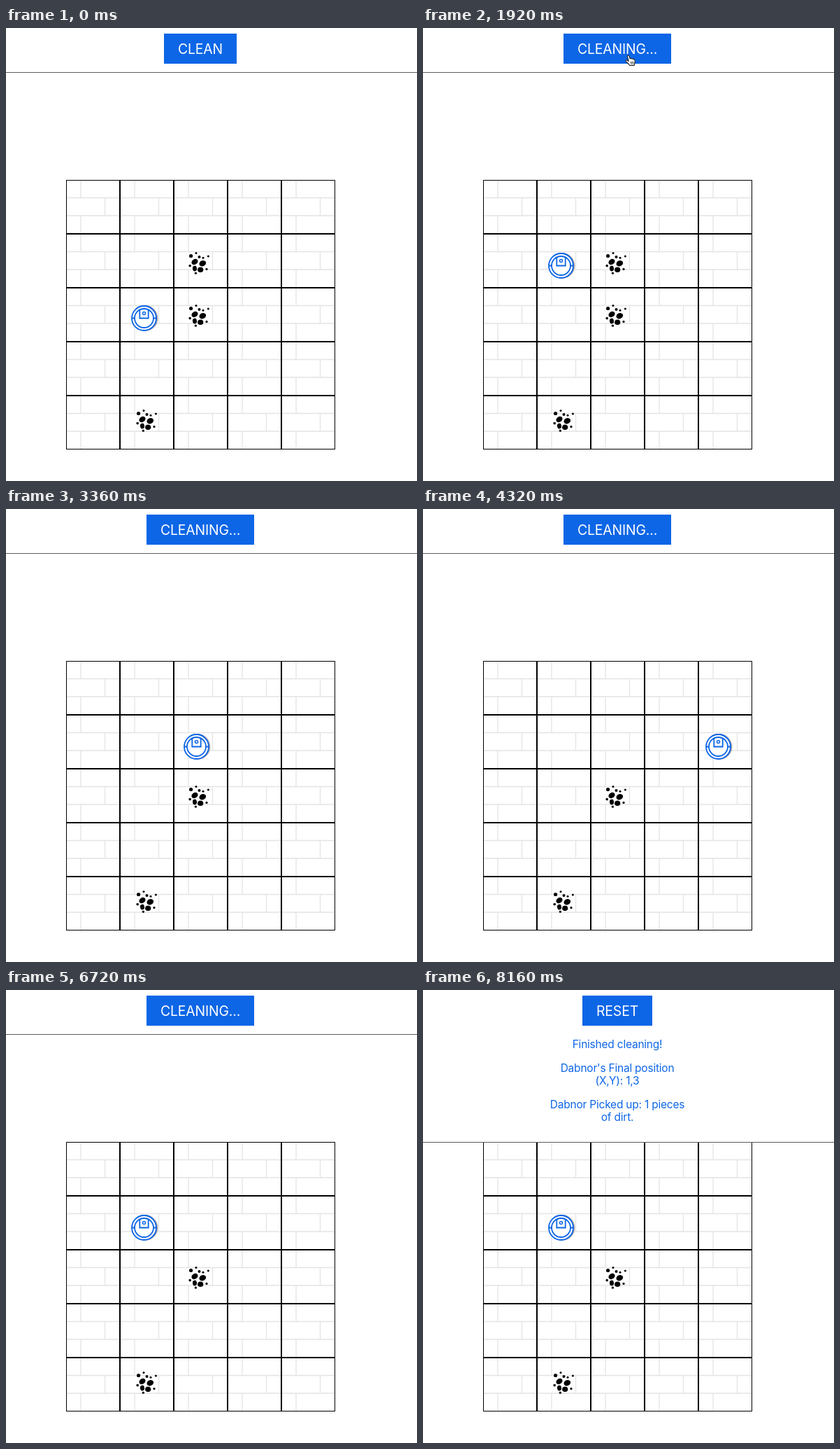
These frames come from a looping animation (588x647 px, 8.64 s). An HTML page:

```html
<!DOCTYPE html>
<html lang="en">
<head>
<meta charset="utf-8">
<title>Robot vacuum</title>
<style>
  html, body { margin: 0; width: 100%; height: 100%; overflow: hidden; background: #fff; }
  svg { display: block; }
  text { font-family: Inter, "Liberation Sans", sans-serif; text-anchor: middle; }
  #label { font-size: 19.4px; letter-spacing: -.15px; fill: #fff; }
  #report { font-size: 15.5px; letter-spacing: -.22px; fill: #0d66e6; }
</style>
</head>
<body>
<svg width="588" height="647" viewBox="0 0 588 647">
  <defs>
    <g id="cell">
      <path d="M1 25.5H76M1 51H76M21 1V25.5M55.5 25.5V51M21 51V76" stroke="#e4e4e4" stroke-width="1.3"/>
      <rect x=".5" y=".5" width="76" height="76" fill="none" stroke="#000"/>
    </g>
    <g id="dirt">
      <circle cx="3.6" cy="5.5" r="2.6"/>
      <circle cx="11" cy="1.6" r="1.5"/>
      <circle cx="15.5" cy="7" r="2"/>
      <circle cx="21" cy="8.3" r="1.5"/>
      <circle cx="28.4" cy="6" r="1.5"/>
      <circle cx="2.2" cy="19.6" r="1.8"/>
      <circle cx="26" cy="24.4" r="1.6"/>
      <circle cx="10.4" cy="30.2" r="1.6"/>
      <ellipse rx="4.9" ry="3.8" transform="translate(9 14) rotate(-35)"/>
      <ellipse rx="5" ry="4" transform="translate(20.3 16.2) rotate(-25)"/>
      <ellipse rx="3" ry="3.9" transform="translate(9 23.5) rotate(-8)"/>
      <ellipse rx="4.1" ry="3.8" transform="translate(17.2 25.3)"/>
    </g>
    <filter id="shadow" x="-20%" y="-20%" width="150%" height="150%">
      <feDropShadow dx="1.3" dy="0" stdDeviation=".7" flood-color="#555" flood-opacity=".6"/>
    </filter>
  </defs>
  <g id="grid"></g>
  <use href="#dirt" x="261" y="320" id="picked"/>
  <use href="#dirt" x="261" y="395"/>
  <use href="#dirt" x="186" y="545"/>
  <g id="robot" fill="none" stroke="#0d66e6" stroke-width="1.8" filter="url(#shadow)">
    <circle r="17.5" fill="#fff"/>
    <circle r="13.5"/>
    <path d="M-17.5 0H-13.5M13.5 0H17.5M-6.2-11.8V0H6.2V-11.8"/>
    <circle cy="-7" r="2" stroke-width="1.5"/>
  </g>
  <path id="rule" d="M0 .5H588" stroke="#5c5c5c"/>
  <rect id="button" y="8" height="43" fill="#0d66e6"/>
  <text id="label" x="278" y="37"></text>
  <g id="report">
    <text x="278" y="83">Finished cleaning!</text>
    <text x="278" y="117">Dabnor's Final position</text>
    <text x="278" y="135">(X,Y): 1,3</text>
    <text x="278" y="169">Dabnor Picked up: 1 pieces</text>
    <text x="278" y="187">of dirt.</text>
  </g>
  <g id="cursor" stroke-linejoin="round" stroke-linecap="round">
    <path id="arrow" d="M1 1V15L4.3 12L6.6 17L9 16L6.8 11.2H11.2Z" fill="#000" stroke="#fff"/>
    <g id="hand">
      <path d="M5.2 9.5L3.6 3.2C3 .8 5.4 .2 6.1 2.4L7.2 6C8 4.9 9.4 5.2 9.8 6.3C10.7 5.4 12 5.8 12.3 6.9C13.4 6.5 14.1 7.3 14.2 8.6C14.4 11 13.6 12.2 13.2 15.4H6.5C5.9 13.4 3.5 12 1.4 9.8C.2 8.3 1.7 7.2 3.1 8.2Z" fill="#fff" stroke="#222" stroke-width="1.1"/>
      <path d="M8.2 10.3L8.6 13M10.1 10.1V13M12 10L11.7 13" fill="none" stroke="#222" stroke-width=".8"/>
    </g>
  </g>
</svg>
<script>
const LOOP = 8640, TICK = 160, STEP = 480;
const CLICK = 1440, START = 1920, PICKUP = 3360, DONE = 7200;
const MOVES = "NNESEESWNWW";
const DIRS = { N: [0, -1], E: [1, 0], S: [0, 1], W: [-1, 0] };
// Pointer position per tick, from 160 ms; it rests on the last approach point until the click.
const APPROACH = [[340, 396], [331, 300], [317, 190], [304, 105], [294, 52], [289, 28]];
const LEAVE = [[289, 28], [289, 16], [289, 3], [289, 38]];

const $ = id => document.getElementById(id);
const show = (id, on) => $(id).setAttribute("display", on ? "inline" : "none");
const place = (id, x, y) => $(id).setAttribute("transform", `translate(${x} ${y})`);

let cells = "";
for (let i = 0; i < 25; i++)
  cells += `<use href="#cell" x="${86 + i % 5 * 77}" y="${217 + Math.floor(i / 5) * 77}"/>`;
$("grid").innerHTML = cells;

function robotAt(t) {
  const count = Math.max(0, Math.floor((t - START) / STEP) + 1);
  let x = 197.5, y = 414.5;
  for (const move of MOVES.slice(0, count)) {
    x += DIRS[move][0] * 75;
    y += DIRS[move][1] * 75;
  }
  return [x, y];
}

function cursorAt(t) {
  const tick = Math.floor(t / TICK);
  if (t >= CLICK) return LEAVE[tick - CLICK / TICK];
  return APPROACH[Math.min(tick, APPROACH.length) - 1];
}

function draw(now) {
  const t = now % LOOP, done = t >= DONE;
  const [label, width] = done ? ["RESET", 100] : t >= CLICK ? ["CLEANING...", 154] : ["CLEAN", 104];
  $("label").textContent = label;
  $("button").setAttribute("x", 278 - width / 2);
  $("button").setAttribute("width", width);
  place("rule", 0, done ? 217 : 63);
  show("report", done);
  show("picked", t < PICKUP);
  place("robot", ...robotAt(t));

  const pos = cursorAt(t);
  show("cursor", pos);
  if (pos) {
    place("cursor", ...pos);
    show("hand", pos[1] < 51);
    show("arrow", pos[1] >= 51);
  }
  requestAnimationFrame(draw);
}
draw(0);
</script>
</body>
</html>
```
